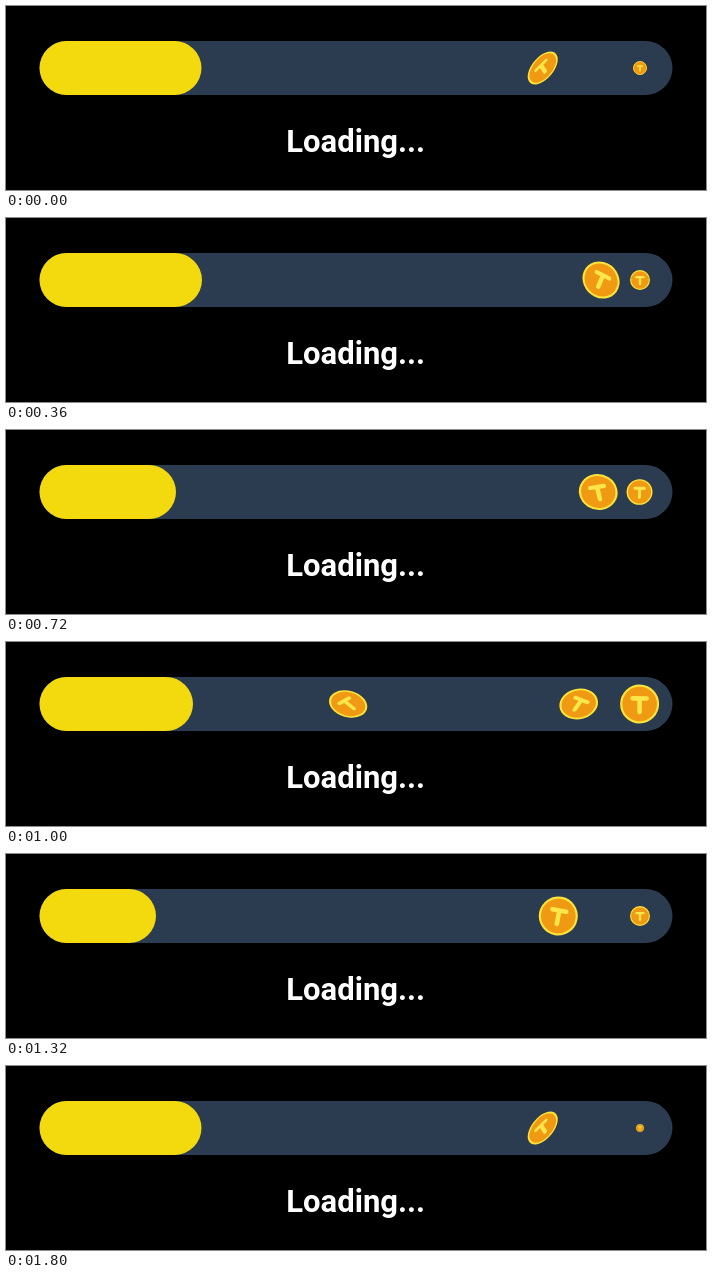
An HTML page that plays this animation: 700x184 px, repeating every 1.84 s.

```html
<!DOCTYPE html>
<html lang="en">
<head>
<meta charset="utf-8">
<title>Loading</title>
<style>
  html, body { margin: 0; width: 100%; height: 100%; overflow: hidden; background: #000; }
  svg { display: block; width: 700px; height: 184px; }
  text { font: 700 31px Roboto, "Noto Sans", sans-serif; fill: #fff; text-anchor: middle; }
</style>
</head>
<body>
<svg viewBox="0 0 700 184">
  <defs>
    <g id="coin">
      <circle r="18.4" fill="#f09913" stroke="#fbe338" stroke-width="2.2"/>
      <path d="M-7-5.6H7M0-5.6V8" fill="none" stroke="#fce64c" stroke-width="4.6" stroke-linecap="round"/>
    </g>
  </defs>
  <rect x="33.5" y="35" width="633" height="54" rx="27" fill="#2b3b50"/>
  <g id="coins"></g>
  <rect id="fill" x="33.5" y="35" height="54" rx="27" fill="#f2da0e"/>
  <text x="349.7" y="145.5">Loading...</text>
</svg>
<script>
  const LOOP = 1840, STEP = 40, FLIGHT = 650;

  // grow, go: start times in ms; spin, axis: degrees; tilt: share of height lost
  const coins = [
    { grow: -93, go: 60, spin: 44, axis: 45, tilt: 0.18 },
    { grow: 227, go: 413, spin: -19, axis: 15, tilt: 0.15 },
    { grow: 547, go: 651, spin: 37, axis: -12, tilt: 0.29 },
    { grow: 725, go: 936, spin: 11.7, axis: 0, tilt: 0 },
    { grow: 1187, go: 1393, spin: -39, axis: -50, tilt: 0.43, hold: STEP }
  ];

  // time, right edge of the fill
  const edge = [
    [0, 195.5], [190, 177], [300, 199], [360, 196], [560, 176], [680, 154],
    [720, 170], [800, 197], [1000, 187], [1040, 184], [1110, 190],
    [1320, 150], [1520, 112], [1570, 100], [1680, 159], [1800, 195.5], [1840, 195.5]
  ];

  const layer = document.getElementById("coins");
  const fill = document.getElementById("fill");

  for (const coin of coins) {
    coin.el = document.createElementNS("http://www.w3.org/2000/svg", "use");
    coin.el.setAttribute("href", "#coin");
    layer.append(coin.el);
  }

  function edgeAt(t) {
    const i = edge.findIndex(([time]) => time > t);
    const [t0, x0] = edge[i - 1], [t1, x1] = edge[i];
    return x0 + (x1 - x0) * (t - t0) / (t1 - t0);
  }

  function travel(age) {
    return (0.0113 * age) ** 3 + 0.034 * Math.max(0, age - 590) ** 2;
  }

  function place(coin, t) {
    let now = t;
    if (coin.grow < 0 && t >= LOOP + coin.grow) now -= LOOP;
    if (coin.hold && t < coin.grow) now += LOOP - coin.hold;
    const age = Math.max(0, now - coin.go);
    const size = Math.min(1, 0.075 * (now - coin.grow) / 19.5);
    const shown = size > 0 && age < FLIGHT;
    coin.el.style.display = shown ? "" : "none";
    if (!shown) return;
    const q = (age / 400) ** 2;
    const squash = Math.max(0.45, 1 - coin.tilt * q);
    coin.el.setAttribute("transform",
      `translate(${634 - travel(age)} 62) rotate(${coin.axis}) ` +
      `scale(${size} ${size * squash}) rotate(${coin.spin * q - coin.axis})`);
  }

  function draw() {
    const t = Math.floor(performance.now() % LOOP / STEP) * STEP;
    fill.setAttribute("width", edgeAt(t) - 33.5);
    for (const coin of coins) place(coin, t);
    requestAnimationFrame(draw);
  }
  draw();
</script>
</body>
</html>
```
